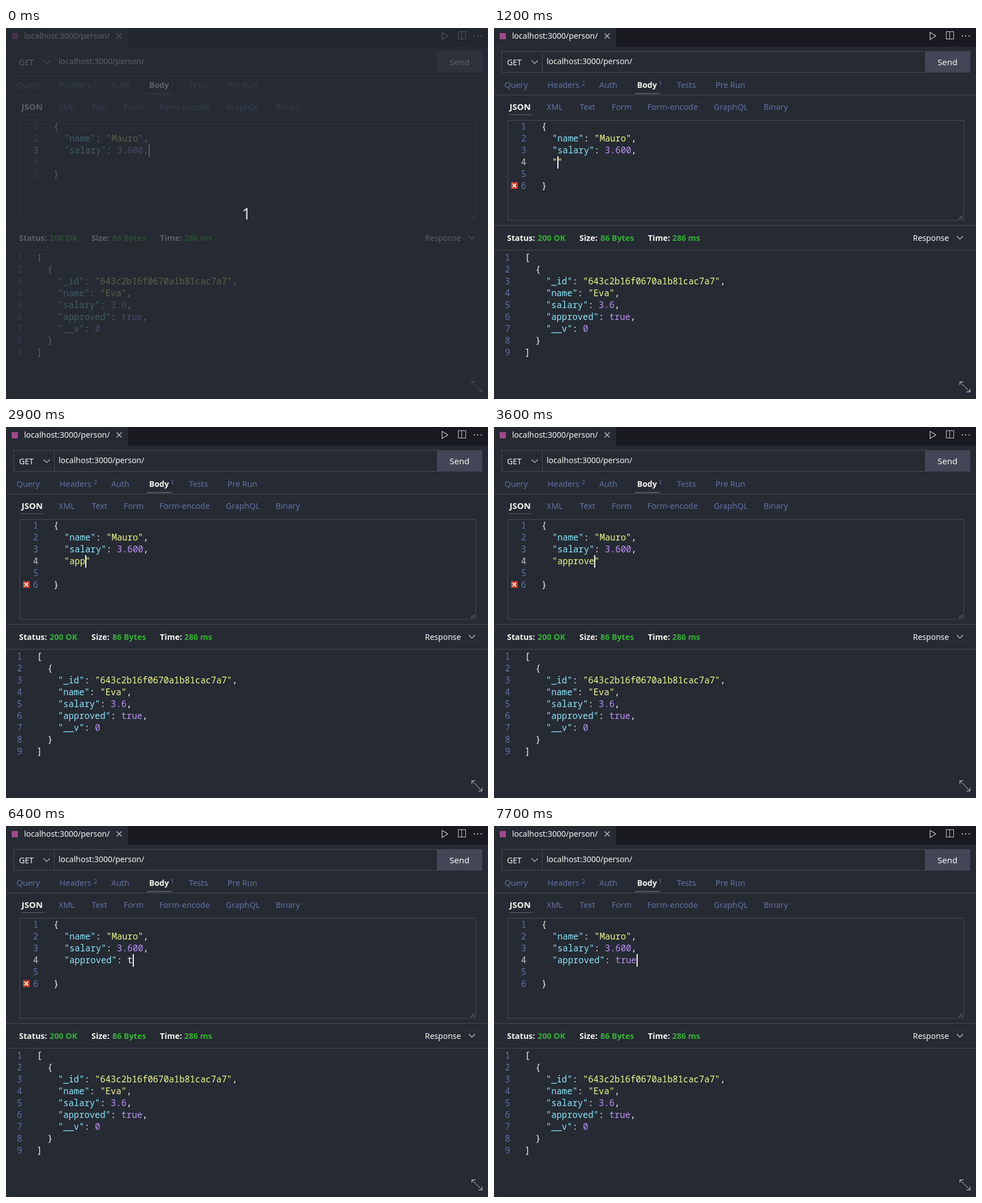
These frames come from a looping animation (852 px wide and 657 px high, 8 s). An HTML page with a canvas:

```html
<!DOCTYPE html>
<html lang="en">
<head>
<meta charset="utf-8">
<title>REST request editor</title>
<style>
  html, body { margin: 0; width: 100%; height: 100%; overflow: hidden; background: #262a33; }
  canvas { display: block; width: 852px; height: 657px; }
</style>
</head>
<body>
<canvas id="stage" width="852" height="657"></canvas>
<script>
const ctx = document.getElementById('stage').getContext('2d');
const LOOP = 8000;
const CELL = 9.33;
const UI = '"Noto Sans", "Open Sans", sans-serif';
const MONO = '15.55px "Noto Sans Mono", "DejaVu Sans Mono", monospace';
const C = {
  bg: '#262a33', bar: '#191a1f', line: '#484b55', button: '#424656',
  text: '#f8f8f2', muted: '#6272a4', active: '#c6c6c6', icon: '#c9cacd',
  key: '#8be9fd', string: '#f1fa8c', value: '#bd93f9', green: '#33b233',
  error: '#c9402a', logo: '#a04a8c'
};

// Each step: start time, content of line 4, cursor column, cursor visible, error line.
const steps = [
  [400, '', 2, true, 6],
  [1000, '', 2, false, 6],
  [1200, '""', 3, true, 6],
  [1700, '"a"', 4, true, 6],
  [2000, '"ap"', 5, true, 6],
  [2200, '"app"', 6, true, 6],
  [2400, '"appo"', 7, true, 6],
  [2900, '"app"', 6, true, 6],
  [3000, '"appr"', 7, true, 6],
  [3200, '"appro"', 8, true, 6],
  [3400, '"approv"', 9, true, 6],
  [3500, '"approve"', 10, true, 6],
  [3700, '"approved"', 11, true, 6],
  [4200, '"approved"', 11, false, 6],
  [4600, '"approved"', 11, true, 6],
  [5000, '"approved"', 12, true, 6],
  [5600, '"approved"', 12, false, 6],
  [5700, '"approved":', 13, true, 6],
  [6200, '"approved": ', 14, true, 6],
  [6400, '"approved": t', 15, true, 6],
  [6500, '"approved": tr', 16, true, 6],
  [6600, '"approved": tr', 16, true, 4],
  [7200, '"approved": tr', 16, false, 4],
  [7500, '"approved": tru', 17, true, 4],
  [7600, '"approved": true', 18, true, 4],
  [7700, '"approved": true', 18, true, 0]
];

const response = [
  '[',
  '  {',
  '    "_id": "643c2b16f0670a1b81cac7a7",',
  '    "name": "Eva",',
  '    "salary": 3.6,',
  '    "approved": true,',
  '    "__v": 0',
  '  }',
  ']'
];

function box(x, y, w, h, color) {
  ctx.fillStyle = color;
  ctx.fillRect(x, y, w, h);
}

function frame(x, y, w, h, color = C.line) {
  ctx.strokeStyle = color;
  ctx.lineWidth = 1;
  ctx.strokeRect(x + 0.5, y + 0.5, w - 1, h - 1);
}

// Open polylines, each given as a flat list of coordinates.
function stroke(color, width, ...lines) {
  ctx.strokeStyle = color;
  ctx.lineWidth = width;
  ctx.beginPath();
  for (const p of lines) {
    ctx.moveTo(p[0], p[1]);
    for (let i = 2; i < p.length; i += 2) ctx.lineTo(p[i], p[i + 1]);
  }
  ctx.stroke();
}

function label(str, x, y, color = C.text, size = 14, weight = 400) {
  ctx.font = `${weight} ${size}px ${UI}`;
  ctx.fillStyle = color;
  ctx.fillText(str, x, y);
}

function tokenColor(token, rest) {
  if (token[0] === '"') return rest.startsWith(':') ? C.key : C.string;
  return /^(\d|true$)/.test(token) ? C.value : C.text;
}

function code(str, x, y) {
  ctx.font = MONO;
  for (const m of str.matchAll(/"[^"]*"|[\d.]+|\w+|[^\s\w"]/g)) {
    ctx.fillStyle = tokenColor(m[0], str.slice(m.index + m[0].length));
    ctx.fillText(m[0], x + m.index * CELL, y);
  }
}

function lineNumber(n, right, y, color = C.muted) {
  ctx.font = MONO;
  ctx.fillStyle = color;
  ctx.fillText(n, right - CELL, y);
}

function drawTabBar() {
  box(216, 0, 636, 33, C.bar);
  box(10, 9, 11, 11, C.logo);
  label('localhost:3000/person/', 32, 19);
  stroke(C.icon, 1.2, [195.5, 9.5, 204.5, 18.5], [204.5, 9.5, 195.5, 18.5]);
  stroke(C.icon, 1.2, [770.7, 7.5, 781, 14, 770.7, 20.5, 770.7, 7]);
  frame(799, 6, 14, 14, C.icon);
  stroke(C.icon, 1, [805.5, 6, 805.5, 20]);
  for (const x of [827, 833, 839]) box(x, 13, 2, 2, C.icon);
}

function drawRequest() {
  frame(13, 41, 750, 38);
  box(85, 41, 1, 38, C.line);
  box(763, 41, 79, 38, C.button);
  label('GET', 23, 66);
  stroke(C.icon, 1.1, [66.5, 57.5, 72, 63, 77.5, 57.5]);
  label('localhost:3000/person/', 93, 64);
  label('Send', 784, 66, C.text, 15);

  const tabs = [['Query', 18.5], ['Headers', 94.5], ['Auth', 186], ['Tests', 323], ['Pre Run', 391.5]];
  for (const [name, x] of tabs) label(name, x, 106, C.muted, 14.3);
  label('2', 155, 102, C.muted, 10.5);
  label('Body', 253, 106, C.text, 14, 600);
  label('1', 291, 102, C.muted, 10.5);
  box(0, 118, 852, 1, C.line);
  box(249, 115, 44, 2, '#565966');

  const kinds = [['XML', 93], ['Text', 151.5], ['Form', 208], ['Form-encode', 271],
    ['GraphQL', 388.5], ['Binary', 476.5]];
  for (const [name, x] of kinds) label(name, x, 145, C.muted, 14.3);
  label('JSON', 27.5, 145, C.text, 15, 600);
  box(26, 153, 42, 1, '#5d606c');
}

function drawError(line) {
  const y = 258 + (line - 5) * 21;
  box(30, y - 6, 12, 12, C.error);
  stroke('#fff', 1.8, [33, y - 3, 39, y + 3], [39, y - 3, 33, y + 3]);
}

function drawEditor(step) {
  const lines = ['{', '  "name": "Mauro",', '  "salary": 3.600,'];
  const current = step ? 4 : 3;
  lines.push(step ? '  ' + step[1] : '');
  if (step) lines.push('');
  lines.push('}');

  frame(24, 163, 807, 178);
  stroke('#9a9ca3', 1, [822, 338, 828, 332], [826, 338, 828, 336]);
  lines.forEach((str, i) => {
    const y = 180 + Math.round(i * 21.05);
    lineNumber(i + 1, 57, y, i + 1 === current ? C.active : C.muted);
    code(str, 84, y);
  });
  if (!step || step[3]) {
    const col = step ? step[2] : 18;
    box(Math.round(84 + col * CELL), 206 + (current - 3) * 21, 2, 22, C.text);
  }
}

function drawResponse() {
  box(0, 349, 852, 1, C.line);
  box(0, 393, 852, 1, C.line);
  const stats = [['Status:', 23, '200 OK', 77], ['Size:', 151, '86 Bytes', 188], ['Time:', 272, '286 ms', 315]];
  for (const [name, x, value, vx] of stats) {
    label(name, x, 377, C.text, 14.3, 600);
    label(value, vx, 377, C.green, 14.3, 600);
  }
  label('Response', 740.5, 377);
  stroke(C.icon, 1.1, [818, 368.5, 823.5, 374, 829, 368.5]);

  response.forEach((str, i) => {
    const y = Math.round(411.5 + i * 21.05);
    lineNumber(i + 1, 28.5, y);
    code(str, 54.5, y);
  });
  stroke(C.icon, 1, [823.5, 626.5, 841.5, 644.5],
    [823.5, 632, 823.5, 626.5, 830, 626.5], [841.5, 639, 841.5, 644.5, 835, 644.5]);
}

function drawCountdown() {
  ctx.globalAlpha = 0.74;
  box(0, 0, 852, 657, C.bg);
  ctx.globalAlpha = 1;
  ctx.textAlign = 'center';
  label('1', 425, 339, '#e2e3e4', 27);
  ctx.textAlign = 'left';
}

function draw(t) {
  const step = steps.findLast(s => s[0] <= t);
  const errorLine = step ? step[4] : t < 100 ? 0 : 5;
  box(0, 0, 852, 657, C.bg);
  drawTabBar();
  drawRequest();
  drawEditor(step);
  if (errorLine) drawError(errorLine);
  drawResponse();
  if (t < 100) drawCountdown();
}

function tick() {
  draw(performance.now() % LOOP);
  requestAnimationFrame(tick);
}
tick();
</script>
</body>
</html>
```
